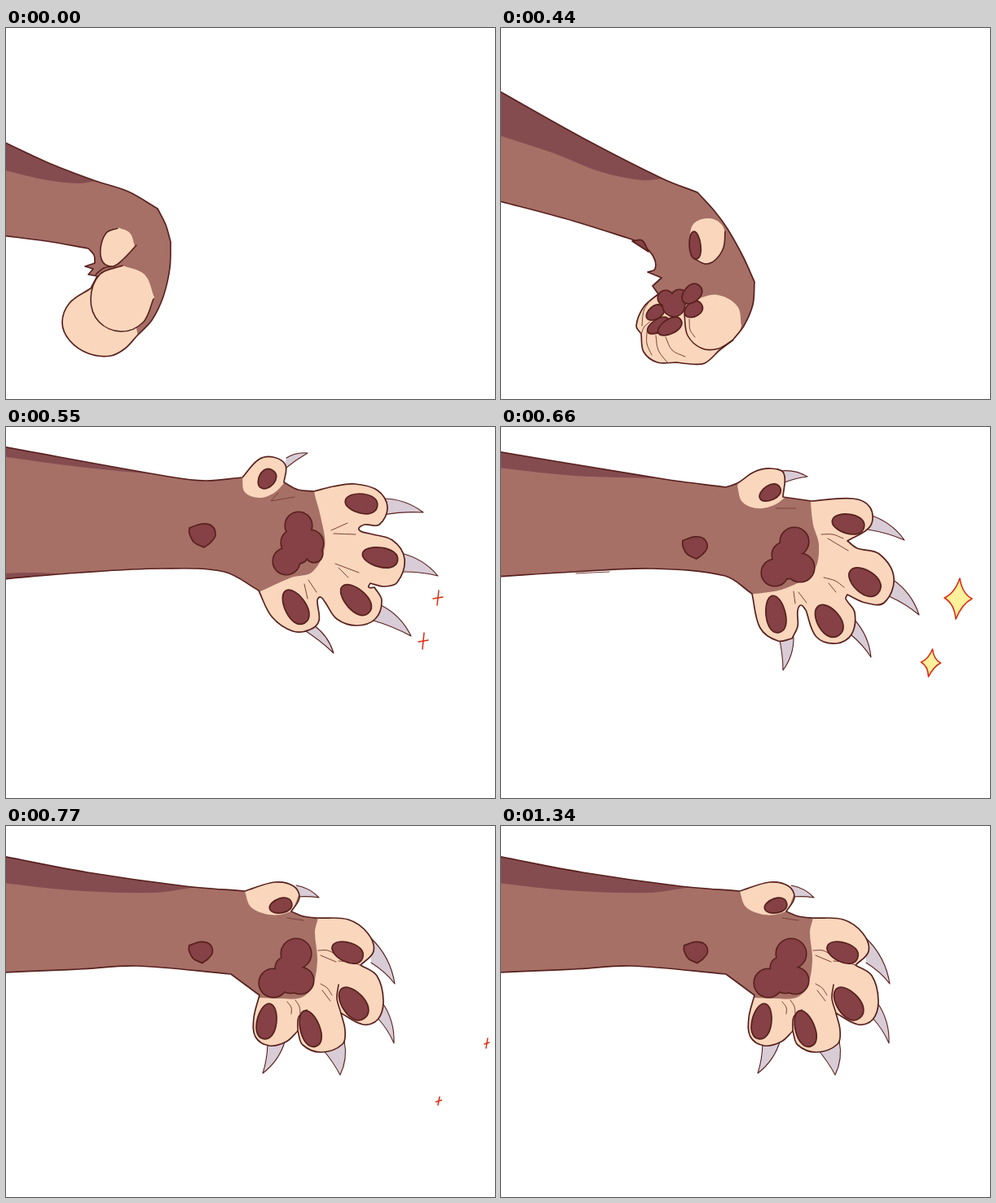
These frames come from a looping animation (600 px wide and 456 px high, 1650 ms). An HTML page with a canvas:

```html
<!DOCTYPE html>
<html lang="en">
<head>
<meta charset="utf-8">
<title>Paw swipe</title>
<style>
html, body { margin: 0; width: 100%; height: 100%; overflow: hidden; background: #fff; }
canvas { display: block; }
</style>
</head>
<body>
<canvas id="stage" width="600" height="456"></canvas>
<script>
const ctx = document.getElementById('stage').getContext('2d');
const LOOP = 1650;
const INK = '#58201d', FUR = '#a67067', SHADE = '#854c50', CREAM = '#fad7bc',
      PAD = '#854145', CLAW = '#d8ccd6', RED = '#dc2b10', YELLOW = '#fff09c';

// Smooth path through "x y x y"; "/" makes a corner, ";" starts a new stroke.
function curve(text) {
  const path = new Path2D();
  for (const strand of text.split(';')) {
    let last = null;
    for (const run of strand.split('/')) {
      const n = run.trim().split(/\s+/).map(Number);
      const pts = last ? [last] : [];
      for (let i = 0; i < n.length; i += 2) pts.push([n[i], n[i + 1]]);
      if (!last) path.moveTo(...pts[0]);
      const slope = i => {
        const a = pts[Math.max(i - 1, 0)], b = pts[Math.min(i + 1, pts.length - 1)];
        const d = Math.hypot(b[0] - a[0], b[1] - a[1]);
        return [(b[0] - a[0]) / d, (b[1] - a[1]) / d];
      };
      for (let i = 1; i < pts.length; i++) {
        const [px, py] = pts[i - 1], [x, y] = pts[i];
        const [ux, uy] = slope(i - 1), [vx, vy] = slope(i);
        const h = Math.hypot(x - px, y - py) / 3;
        path.bezierCurveTo(px + ux * h, py + uy * h, x - vx * h, y - vy * h, x, y);
      }
      last = pts.at(-1);
    }
  }
  return path;
}

function fill(path, color) {
  ctx.fillStyle = color;
  ctx.fill(path);
}

function stroke(path, color = INK, width = 1.7) {
  ctx.strokeStyle = color;
  ctx.lineWidth = width;
  ctx.stroke(path);
}

function limb(outline, shades, creams) {
  const body = curve(outline);
  body.closePath();
  fill(body, FUR);
  ctx.save();
  ctx.clip(body);
  shades.forEach(s => fill(curve(s), SHADE));
  creams.forEach(c => fill(curve(c), CREAM));
  ctx.restore();
  stroke(body);
}

const edges = text => stroke(curve(text), INK, 1.6);
const creases = text => stroke(curve(text), '#7d4038', 1);

function pad(path) {
  path.closePath();
  fill(path, PAD);
  stroke(path);
}

// Egg-shaped pad: half length, half width, angle of the blunt end.
function egg(x, y, l, w, deg) {
  const path = new Path2D();
  path.moveTo(-l, 0);
  path.bezierCurveTo(-l, -w * 1.1, l, -w * 1.55, l, 0);
  path.bezierCurveTo(l, w * 1.55, -l, w * 1.1, -l, 0);
  const placed = new Path2D();
  placed.addPath(path, new DOMMatrix().translate(x, y).rotate(deg));
  pad(placed);
}

function wristPad(x, y, scale) {
  const placed = new Path2D();
  placed.addPath(curve('-16 -9 0 -14 12 -11 16 0 10 9 2 15 / -10 9 -16 -2 -16 -9'),
    new DOMMatrix().translate(x, y).scale(scale));
  pad(placed);
}

function palm(...lobes) {
  const path = new Path2D();
  for (const [x, y, r] of lobes) {
    path.moveTo(x + r, y);
    path.arc(x, y, r, 0, 7);
  }
  stroke(path, INK, 3.2);
  fill(path, PAD);
}

// Hooked triangle from base a over the tip to base b.
function claw(ax, ay, tx, ty, bx, by) {
  const dx = tx - ax, dy = ty - ay;
  const path = new Path2D();
  path.moveTo(ax, ay);
  path.quadraticCurveTo((ax + tx) / 2 + dy * 0.17, (ay + ty) / 2 - dx * 0.17, tx, ty);
  path.quadraticCurveTo((bx + tx) / 2 + dy * 0.06, (by + ty) / 2 - dx * 0.06, bx, by);
  fill(path, CLAW);
  stroke(path, INK, 1.1);
}

function glint(x, y, w, h) {
  stroke(new Path2D(`M${x + 1} ${y - h}L${x - 1} ${y + h}M${x - w} ${y + 1}L${x + w} ${y - 1}`), RED, 1.5);
}

function sparkle(x, y, w, h) {
  const a = w * 0.28, b = h * 0.25;
  const star = new Path2D(`M${x + 2} ${y - h}Q${x + a} ${y - b} ${x + w} ${y}Q${x + a} ${y + b} ${x - 3} ${y + h}
    Q${x - a} ${y + b} ${x - w} ${y - 1}Q${x - a} ${y - b} ${x + 2} ${y - h}Z`);
  fill(star, YELLOW);
  stroke(star, RED, 1.6);
}

function curled() {
  limb(`-5 139 55 167 110 188 150 201 186 222 / 196 242 202 263 / 201 295 193 330 179 359 161 378
      146 394 128 403 101 400 78 384 69 362 78 338 104 320 / 112 305 / 101 303 / 107 296 / 97 293 / 109 289
      / 108 279 101 271 / 50 262 -5 255`,
    ['-5 130 / 110 188 / 90 191 50 187 -5 174'],
    ['108 316 / 155 340 / 160 369 / 162 379 / 150 420 / 50 420 / 50 316',
     '143 292 170 303 182 331 / 168 362 141 373 114 361 104 333 115 303 143 292',
     '137 245 152 252 158 268 / 144 284 131 293 119 288 116 271 123 252 137 245']);
  edges('143 292 115 303 104 333 114 361 141 373 168 362 181 333');
  edges('137 246 123 252 116 271 119 288 131 293 144 284 160 267; 131 293 120 295 110 303');
}

function rising() {
  limb(`-5 76 100 135 200 186 241 202 / 262 225 278 247 297 281 311 312 / 309 340 298 366 284 384
      / 268 396 / 250 412 232 413 215 411 / 192 411 175 398 172 376 / 166 366 175 343 193 327
      / 186 317 / 197 307 / 180 300 / 189 296 187 281 172 264 / 155 258 78 234 -5 212`,
    ['-5 60 / 200 185 / 172 187 120 176 65 154 -5 131'],
    ['160 326 / 235 335 / 265 328 290 342 295 366 / 290 384 / 280 420 / 150 420',
     '231 264 236 241 256 234 271 242 275 258 267 281 252 289 237 283 231 264']);
  edges('225 352 229 378 247 394 267 394 284 384; 275 250 273 270 263 285 251 290 238 284');
  creases('179 374 179 388 185 402; 190 378 193 396 204 411; 202 380 210 396 226 404');
  creases('231 358 232 371 238 380; 182 336 175 348 173 366; 183 361 176 367 172 376');
  pad(curve('161 262 173 261 181 275'));
  egg(238, 267, 17, 7, 85);
  egg(189, 350, 12, 8, -35);
  egg(193, 366, 15, 8, -30);
  egg(207, 367, 16, 9, -30);
  egg(236, 346, 12, 9, -35);
  palm([202, 332, 9], [219, 332, 10], [212, 341, 13]);
  egg(234, 327, 14, 10, -45);
}

function spread() {
  claw(344, 38, 370, 32, 340, 53);
  claw(462, 88, 512, 105, 462, 108);
  claw(484, 155, 530, 183, 486, 178);
  claw(460, 219, 497, 257, 448, 237);
  claw(378, 244, 402, 278, 365, 249);
  limb(`-5 24 200 61 245 66 290 62 / 310 40 328 37 343 47 341 68 / 358 77 378 79 / 402 73 428 70 456 78 468 98
      458 120 440 120 433 126 446 131 474 139 489 162 480 191 464 196 447 192 / 445 197 452 197
      / 461 213 453 236 430 244 406 236 392 216 / 386 209 382 213 384 238 373 249 352 251 326 233 310 201
      / 268 178 190 174 90 179 -5 187`,
    ['-5 20 / 190 59 / 90 49 -5 36', '-5 180 35 179 75 181 / -5 190'],
    ['378 60 / 378 79 386 110 391 148 376 178 350 185 310 203 / 290 270 / 510 270 / 510 60',
     '290 62 293 80 311 87 329 81 342 68 / 350 30 / 300 30']);
  creases('399 127 419 118; 402 131 429 132; 404 168 433 179; 408 173 420 185');
  creases('371 188 381 203; 366 193 370 211; 334 81 / 325 91 / 354 86');
  wristPad(241, 133, 1);
  palm([359, 121, 16], [354, 142, 16], [373, 143, 16], [378, 156, 10], [344, 165, 16], [360, 157, 10]);
  egg(320, 64, 13, 10, -55);
  egg(436, 94, 20, 12, 10);
  egg(459, 160, 22, 12, 12);
  egg(429, 212, 23, 13, 45);
  egg(355, 221, 23, 13, 60);
}

function lowering() {
  claw(343, 54, 376, 61, 348, 68);
  claw(452, 108, 495, 139, 450, 126);
  claw(480, 187, 513, 231, 476, 208);
  claw(432, 235, 454, 283, 429, 255);
  claw(359, 258, 346, 299, 341, 258);
  limb(`-5 30 200 64 276 74 / 290 69 311 55 331 51 347 57 346 86 / 381 91 / 432 88 453 99 453 122 425 140
      / 437 149 464 156 482 185 470 216 447 216 425 206 / 423 211 434 228 430 255 412 266 387 258 374 225
      / 368 219 364 226 364 245 357 260 / 340 263 318 247 308 205 / 275 183 185 174 90 178 -5 184`,
    ['-5 25 / 195 63 / 90 60 -5 50'],
    ['380 70 / 380 92 383 120 390 145 384 176 350 198 306 206 / 290 280 / 510 280 / 510 70',
     '290 73 296 92 315 100 335 96 348 87 / 360 40 / 300 40']);
  creases('393 132 407 132 420 137; 401 137 426 152; 396 185 410 189 421 197; 402 192 411 203');
  creases('359 202 361 217; 365 203 375 216; 337 100 362 100; 92 180 133 178');
  wristPad(238, 148, 0.94);
  palm([360, 141, 17], [348, 157, 15], [367, 173, 17], [336, 179, 16], [354, 171, 15]);
  egg(330, 81, 14, 9, -30);
  egg(426, 119, 20, 12, 12);
  egg(446, 190, 22, 14, 38);
  egg(402, 238, 22, 14, 55);
  egg(337, 230, 23, 12, 80);
}

function resting() {
  claw(356, 73, 384, 88, 357, 87);
  claw(447, 137, 477, 194, 448, 168);
  claw(461, 216, 476, 267, 456, 236);
  claw(415, 264, 410, 306, 389, 275);
  claw(343, 262, 315, 304, 321, 267);
  limb(`-5 37 100 57 220 74 293 80 / 330 69 353 74 360 88 350 105 / 365 111 382 113 420 115 444 132 451 154 435 171
      / 455 184 463 215 456 238 438 244 411 230 / 416 251 413 268 387 278 364 269 358 252
      / 344 265 323 270 306 259 304 236 311 208 / 276 182 / 160 172 90 176 -5 180`,
    ['-5 30 / 234 75 / 180 82 80 79 -5 70'],
    ['383 95 / 383 112 379 130 382 165 376 197 362 211 335 212 308 211 / 290 290 / 500 290 / 500 95',
     '293 80 300 99 318 108 336 109 352 104 / 370 55 / 300 55']);
  edges('358 252 359 235 369 226; 411 230 406 212 408 195');
  creases('383 153 395 153 406 159; 386 159 405 167; 435 171 422 167 408 166; 386 194 394 199 400 208');
  creases('388 202 398 215; 345 216 350 223 350 231; 355 214 360 222 361 231; 345 113 365 116');
  wristPad(239, 155, 0.9);
  palm([356, 157, 18], [344, 174, 13], [361, 190, 16], [328, 193, 17], [349, 191, 14]);
  egg(337, 98, 14, 9, -15);
  egg(419, 155, 20, 12, 22);
  egg(426, 218, 23, 14, 52);
  egg(373, 249, 23, 12, 72);
  egg(320, 240, 22, 12, 100);
}

function render(time) {
  ctx.fillStyle = '#fff';
  ctx.fillRect(0, 0, 600, 456);
  if (time < 440) curled();
  else if (time < 550) rising();
  else if (time < 660) {
    spread();
    glint(530, 210, 6, 9);
    glint(512, 263, 6, 10);
  } else if (time < 770) {
    lowering();
    sparkle(561, 211, 17, 25);
    sparkle(527.5, 290, 12, 17);
  } else {
    resting();
    if (time < 880) {
      glint(590, 267, 3, 6);
      glint(531, 338, 3.5, 5);
    }
  }
}

ctx.lineJoin = ctx.lineCap = 'round';
const begin = performance.now();
function tick() {
  render((performance.now() - begin) % LOOP);
  requestAnimationFrame(tick);
}
tick();
</script>
</body>
</html>
```
